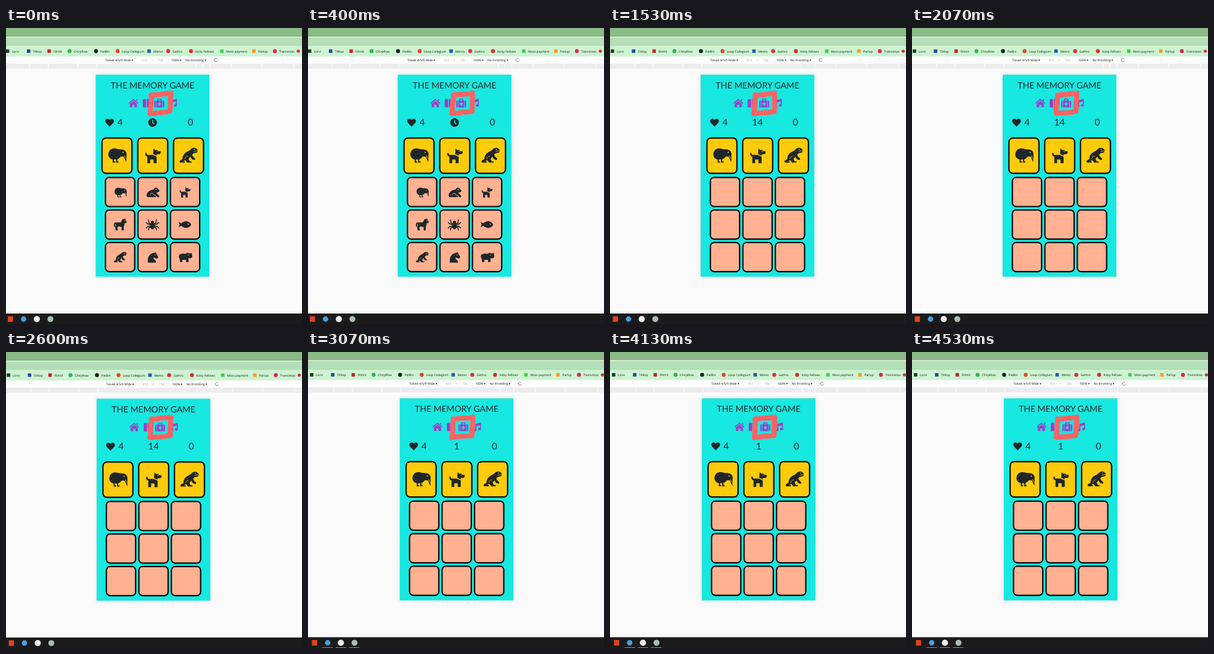
An HTML page that plays this animation: 480x480 px, repeating every 4590 ms.

```html
<!DOCTYPE html>
<html lang="en">
<head>
<meta charset="utf-8">
<title>Memory game</title>
<style>
  html, body { margin: 0; width: 100%; height: 100%; overflow: hidden; background: #fafafa; }
  svg { display: block; width: 100vw; height: 100vh; }
  text { text-rendering: geometricPrecision; white-space: pre; }
  .bar { font: 5px "Open Sans", sans-serif; fill: #101a14; }
  .game { font-family: Lato, sans-serif; fill: #1d2528; }
  .ink { fill: #1f2629; stroke: none; }
  .line { fill: none; stroke: #1f2629; }
</style>
</head>
<body>
<svg id="stage" viewBox="0 0 480 480" xmlns="http://www.w3.org/2000/svg">
  <g id="page"></g>
  <g id="mark" fill="none" stroke="#ff6263" stroke-linecap="round" stroke-linejoin="round">
    <path stroke-width="8"/>
    <path stroke-width="5.6"/>
  </g>
</svg>
<script>
const LOOP = 4590, FPS = 15, SCENE_STEPS = 23;

const scenes = [
  { x: 0, y: 0, time: '' },
  { x: 1.5, y: 0, time: '14' },
  { x: 3.4, y: -0.5, time: '1' }
];

const rect = (x, y, w, h, fill, more = '') =>
  `<rect x="${x}" y="${y}" width="${w}" height="${h}" fill="${fill}" ${more}/>`;
const dot = (x, y, r, fill) => `<circle cx="${x}" cy="${y}" r="${r}" fill="${fill}"/>`;
const label = (x, y, str, more = 'class="bar"') => `<text x="${x}" y="${y}" ${more}>${str}</text>`;
const ink = d => `<path class="ink" d="${d}"/>`;
const line = (d, w) => `<path class="line" stroke-width="${w}" d="${d}"/>`;
const gap = (d, w, c) => `<path fill="none" stroke="${c}" stroke-width="${w}" d="${d}"/>`;
const place = (x, y, s, body) => `<g transform="translate(${x} ${y}) scale(${s})">${body}</g>`;

// Animals: each takes the card colour for its cut-out details
const animals = {
  kiwi: c => ink('M0 10C0 4 4 0 9.5 0C13.5 0 15 1.5 19 1.5C25 1 29.5 4 29.5 9L29 22.5L25 13.5L20.5 13C18 16 15 18 12 18H7C3 17 0 14 0 10Z') +
    line('M8 17v5h3M13.5 17v5h3', 2) + dot(24, 6.5, 1, c) + gap('M26 11.5L28 16.5', 0.9, c),
  dog: c => ink('M1 7Q2.5 7 2.5 9Q2.5 10.5 4 10.5H12L18.5 13.5V24H13.5V18H8V24H3.5V13.5Q0 12.5 0 9Q0 7 1 7Z' +
    'M13.5 0L16 2.5H19.5L21 4.5H25V6.5Q25 9.5 21.5 9.5H18.5V11.8L12.8 9.2Z') + dot(19, 5, 0.8, c),
  lizard: c => ink('M17 4Q20 0 24 0Q28 0 30 4L29 7.5L23 9L21 11L22 14L26 17.5L25 20L20.5 18.5L18 14.5L15 18L17 22H20V24H13L9.5 20L6 22H9V24H1Q-.5 21 2 20L5 18.5Q5 12 10 8Z') +
    gap('M23 6L29.5 4.8M9 18Q10 13.5 14 13.5', 0.8, c) + dot(24.5, 2.6, 0.8, c),
  frog: c => ink('M11.5 3.5Q13 0 16 .6Q18 1 18.5 3Q21 4 21 6Q20 8 15.5 9L20.5 14V16H17.5L13.5 12L12.5 14H15V16H2Q0 16 0 13Q1 5 11.5 3.5Z') +
    gap('M6 13Q6 9.5 9 9.5Q12 10 12 13', 0.8, c) + dot(15.6, 3.6, 0.9, c),
  horse: c => ink('M3 6H11L14 1Q16 0 19 0L18.5 2L21 5L20 7L17.5 7L17 11L16 12.5V19H12.5V13.5L7 12.5L5.5 14L6.5 19H3L2 14L3 11V8Q1.5 8 2 13H0V9Q0 6 3 6Z') +
    dot(17.6, 3.6, 0.6, c),
  spider: () => {
    const legs = line('M1 0L5.5 -2L6.5 -8M2 1L7.5 -.5L10.5 -3M2 3L7.5 3.5L10.5 6.5M1 4L5.5 5.5L6.5 10', 1.5);
    return `<ellipse class="ink" cy="3.4" rx="3.7" ry="4.8"/><circle class="ink" cy="-3.2" r="2.6"/>` +
      legs + `<g transform="scale(-1 1)">${legs}</g>`;
  },
  fish: c => ink('M0 1.5L4 4Q8 .5 13 .5Q18 1.5 20.5 6Q18 10.5 13 11.5Q8 11.5 4 8L0 10.5L1.5 6Z') + dot(15.5, 5.4, 1, c),
  head: c => ink('M1 18Q0 9 5 4.5Q8 2 12 2L13 0L14 2.5Q16 4 18 9L16 11.5L13.5 11L11 9.5L10 11Q11 13 14 15V18Z') + dot(12.6, 5.6, 0.8, c),
  hippo: c => ink('M2 4Q6 1.5 11 2.5L13 2.5Q14 .5 16 1L17 2H20L21 1L22.5 2.5Q23 4 23 8Q22 10 19 10L17 9.5V16H13V12.5H7V16H3V11Q0 8 2 4Z') +
    dot(17, 4.8, 0.7, c)
};

function browser() {
  const bands = [[-10, 24, '#8aba86'], [14, 1.5, '#dcefdc'], [15.5, 14, '#b3deb7'], [29.5, 16.5, '#cdf3d1'],
    [46, 12, '#fcfcfc'], [58, 8, '#ececec']];
  let out = rect(-10, -10, 500, 500, '#fafafa');
  for (const [y, h, c] of bands) out += rect(-10, y, 500, h, c);
  for (const x of [38, 68, 116, 147, 308, 319, 330, 365, 414, 466]) out += rect(x, 58, 0.8, 8, '#fff');

  const links = [
    [9.5, 'Lorvi', '#26352a'], [43.7, 'TilKop', '#24489c'], [77, 'Filmlit', '#c8202c'],
    [110, 'ChirpRow', '#2fb457', 1], [153, 'PatBin', '#1b1f23', 1], [188, 'Loop Collegium', '#e8432f', 1],
    [239, 'Memo', '#2458b0'], [270, 'Gathro', '#e02c46', 1], [307, 'Kicky Fellows', '#d92b35', 1],
    [357, 'Moss payment', '#3fce50'], [409, 'Parlup', '#f79a1f'], [443, 'Trainvistas', '#ea1f55', 1]
  ];
  for (const [x, name, c, round] of links) {
    out += round ? dot(x - 7, 37.5, 3.2, c) : rect(x - 9.8, 34.7, 5.6, 5.6, c);
    out += label(x, 39.5, name);
  }
  out += dot(474, 37.5, 2.6, '#d9323a');

  out += label(161, 53.9, 'Tolvek 4/5/9 Wide ▾') + label(268, 53.9, '100% ▾') + label(291, 53.9, 'No throttling ▾');
  const dim = 'class="bar" style="fill:#aaa"';
  out += label(220, 53.9, '414', dim) + label(236, 53.9, '×', dim) + label(246.5, 53.9, '736', dim);
  out += gap('M342.2 50.2A2.6 2.6 0 1 0 342.8 52.6', 0.8, '#666');

  out += rect(-10, 463, 500, 30, '#1b1b1c');
  out += rect(3, 467.5, 8.4, 9, '#e0451f') + dot(28.5, 472, 4.4, '#4a9fe0') + dot(50, 472, 5, '#f0f0f0') + dot(72, 472, 4.8, '#a9bfb2');
  out += `<g id="under">${[20, 41.5, 63].map(x => rect(x, 479.7, 17, 1, '#8fb4cc')).join('')}</g>`;
  return out;
}

function nav() {
  const p = '#9b3fc6', bg = '#17e8e0';
  return `<g fill="${p}">` +
    '<path d="M206.5 114.8L214.6 121.8L213.6 123L206.5 117L199.4 123L198.4 121.8L203 117.8ZM210.6 115.6h2v3.4l-2-1.7Z"/>' +
    '<path d="M206.5 118.2L212.3 123V128.6H208.2V124.6H204.8V128.6H200.7V123Z"/>' +
    '<rect x="221.7" y="115.2" width="12" height="13.6" rx="1.5"/>' +
    '<path d="M245 117.7V115.7Q245 114.7 246 114.7H251Q252 114.7 252 115.7V117.7H255Q256.5 117.7 256.5 119.2V127.2Q256.5 128.7 255 128.7H242Q240.5 128.7 240.5 127.2V119.2Q240.5 117.7 242 117.7ZM246.5 116.2V117.7H250.5V116.2Z" fill-rule="evenodd"/>' +
    '<path d="M268 117L277 114.8V125.5H275.5V119L269.5 120.7V127H268Z"/>' +
    '<ellipse cx="267.6" cy="127" rx="2.4" ry="2"/><ellipse cx="274.7" cy="125.5" rx="2.4" ry="2"/></g>' +
    gap('M243.2 117.7V128.7M253.8 117.7V128.7', 0.9, bg) + gap('M248.5 120.2V126.2M245.5 123.2H251.5', 1.7, bg) +
    gap('M227.8 115V129', 1.2, bg);
}

function card(x, y, w, h, r, fill) {
  return rect(x + 1.1, y + 1.1, w - 2.2, h - 2.2, fill, `rx="${r}" stroke="#0b0b0b" stroke-width="2.2"`);
}

function game() {
  const gold = '#fdcb08', peach = '#ffb191';
  const digits = 'class="game" font-size="15" text-anchor="middle"';
  let out = rect(145.5, 75.7, 184.3, 327.6, '#17e8e0', 'style="filter:drop-shadow(0 0 3px rgba(0,0,0,.12))"');
  out += label(237.7, 97.7, 'THE MEMORY GAME', 'class="game" font-size="13.9" text-anchor="middle"');
  out += nav();
  out += ink('M168 160L162 153.8Q160 151 161.6 148.6Q164.6 145.4 168 149Q171.4 145.4 174.4 148.6Q176 151 174 153.8Z');
  out += label(185, 158.2, '4', digits) + label(299, 158.2, '0', digits);
  out += `<g id="clock">${dot(237.7, 153.2, 7, '#1f2629') + gap('M237.7 149V153.4L240.4 155.6', 1.4, '#17e8e0')}</g>`;
  out += label(237.7, 158.2, '', 'id="time" ' + digits);

  const top = [['kiwi', 166, 195.3], ['dog', 225.8, 195.3], ['lizard', 281, 194.3]];
  top.forEach(([name, x, y], i) => {
    out += card(154.6 + 58 * i, 177.3, 50.8, 59.4, 6.5, gold) + place(x, y, 1, animals[name](gold));
  });

  const grid = [
    ['kiwi', 176, 259, 0.67], ['frog', 228, 258.3, 1], ['dog', 281.5, 258, 0.71],
    ['horse', 175, 309.3, 1], ['spider', 237.5, 318.2, 1], ['fish', 280, 312.8, 1],
    ['lizard', 174.5, 363, 0.71], ['head', 229, 362.6, 1], ['hippo', 279, 363.6, 1]
  ];
  let icons = '';
  grid.forEach(([name, x, y, s], i) => {
    out += card(160.2 + 52.7 * (i % 3), 241.2 + 52.8 * Math.floor(i / 3), 49.6, 49.4, 6, peach);
    icons += place(x, y, s, animals[name](peach));
  });
  return out + `<g id="icons">${icons}</g>`;
}

// Hand-drawn square, redrawn with fresh wobble on every step
function scribble(seed, wobble) {
  let s = seed * 7919 + 17;
  const rnd = () => (s = (s * 16807) % 2147483647) / 2147483647 * 2 - 1;
  for (let i = 0; i < 4; i++) rnd();
  const corners = [[235.6, 109], [267.2, 105.8], [266, 135.2], [233.8, 138.8], [236, 108.5]];
  const pts = [];
  for (let i = 0; i < 4; i++) {
    const [ax, ay] = corners[i], [bx, by] = corners[i + 1];
    for (let k = 0; k < 4; k++) {
      pts.push([ax + (bx - ax) * k / 4 + rnd() * wobble, ay + (by - ay) * k / 4 + rnd() * wobble]);
    }
  }
  pts.push(corners[4]);
  return 'M' + pts.map(p => p.map(v => v.toFixed(1)).join(' ')).join('L');
}

const $ = id => document.getElementById(id);
const page = $('page'), strokes = $('mark').children;
page.innerHTML = browser() + game();
const show = (id, on) => $(id).setAttribute('visibility', on ? 'visible' : 'hidden');

let last = -1;
function draw(now) {
  const step = Math.floor((now % LOOP + 5) * FPS / 1000);
  if (step === last) return;
  last = step;
  const n = Math.min(2, Math.floor(step / SCENE_STEPS)), { x, y, time } = scenes[n];
  page.setAttribute('transform', `translate(${x} ${y})`);
  $('time').textContent = time;
  show('clock', n === 0);
  show('icons', n === 0);
  show('under', n === 2);
  strokes[0].setAttribute('d', scribble(step + 1, 0.6));
  strokes[1].setAttribute('d', scribble(step + 101, 1.7));
}

const start = performance.now();
function tick() {
  draw(performance.now() - start);
  requestAnimationFrame(tick);
}
tick();
</script>
</body>
</html>
```
